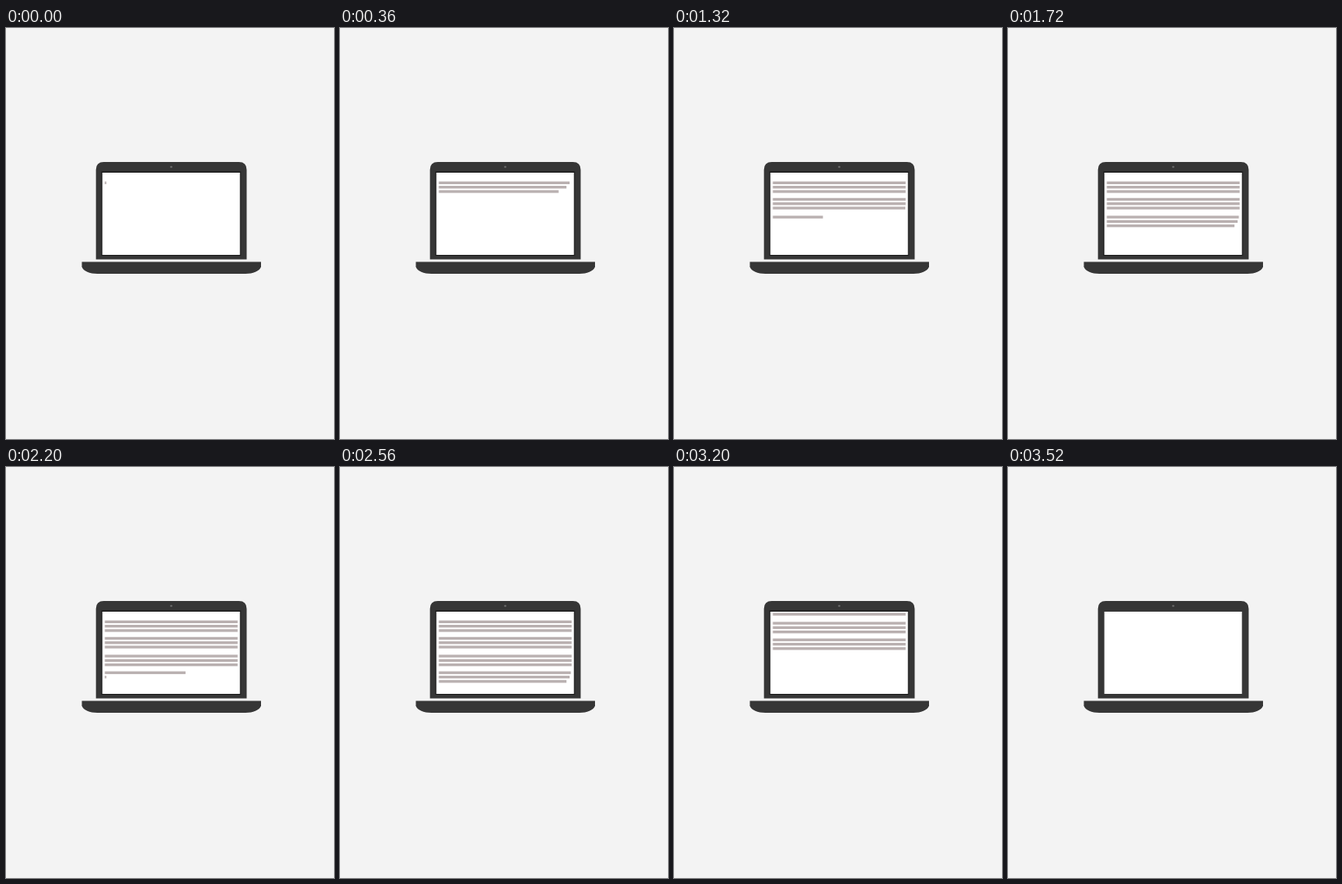
Animation, 400 px wide and 500 px high, one loop 3560 ms. Source, as an HTML page:

```html
<!DOCTYPE html>
<html lang="en">
<head>
<meta charset="utf-8">
<title>Laptop typing</title>
<style>
  html, body { margin: 0; width: 100%; height: 100%; overflow: hidden; background: #f3f3f3; }
  svg { display: block; }
</style>
</head>
<body>
<svg width="400" height="500" viewBox="0 0 400 500">
  <g fill="#363636">
    <path d="M109.7 281.5V172.5Q109.7 163 119.2 163H284Q293.5 163 293.5 172.5V281.5Z"/>
    <path d="M92.5 284.5H311V290.5C309 296 301 299 292 299H111.500C102 299 94.500 296 92.500 290.500Z"/>
  </g>
  <circle cx="201.500" cy="169" r="1.300" fill="#6a6a6a"/>
  <rect id="bezel" x="116.200" y="174.500" width="170.300" height="102.500" fill="#1c1c1c"/>
  <rect x="117.500" y="176" width="167.800" height="100" fill="#fff"/>
  <svg x="117.500" y="176" width="167.800" height="100" viewBox="117.500 176 167.800 100">
    <g id="page" fill="#b9b0b0"></g>
  </svg>
</svg>
<script>
const LOOP = 3560, GROW = 600, STAGGER = 80;
const SCROLL_START = 2980, SCROLL_TIME = 300, BEZEL_OFF = 3520;
const LINE_WIDTH = 162, LINE_PITCH = 5.3;
const paragraphs = [
  { y: 186.7, start: 0 },
  { y: 206.8, start: 640 },
  { y: 228.4, start: 1280 },
  { y: 248.6, start: 2120 }
];

const page = document.getElementById('page');
const bezel = document.getElementById('bezel');
const clamp = v => Math.min(1, Math.max(0, v));
const expoOut = p => p === 1 ? 1 : 1 - 2 ** (-10 * p);

const lines = paragraphs.flatMap(({ y, start }) => [0, 1, 2].map(i => {
  const bar = document.createElementNS('http://www.w3.org/2000/svg', 'rect');
  bar.setAttribute('x', 120.5);
  bar.setAttribute('y', y + i * LINE_PITCH);
  bar.setAttribute('height', 3.3);
  page.append(bar);
  return { bar, start: start + i * STAGGER };
}));

function draw(t) {
  for (const { bar, start } of lines) {
    bar.setAttribute('width', LINE_WIDTH * expoOut(clamp((t - start) / GROW)));
  }
  const scroll = 100 * clamp((t - SCROLL_START) / SCROLL_TIME) ** 3;
  page.setAttribute('transform', `translate(0 ${-scroll})`);
  bezel.setAttribute('visibility', t < BEZEL_OFF ? 'visible' : 'hidden');
}

const origin = performance.now();
function tick() {
  draw((performance.now() - origin) % LOOP);
  requestAnimationFrame(tick);
}
draw(0);
requestAnimationFrame(tick);
</script>
</body>
</html>
```
